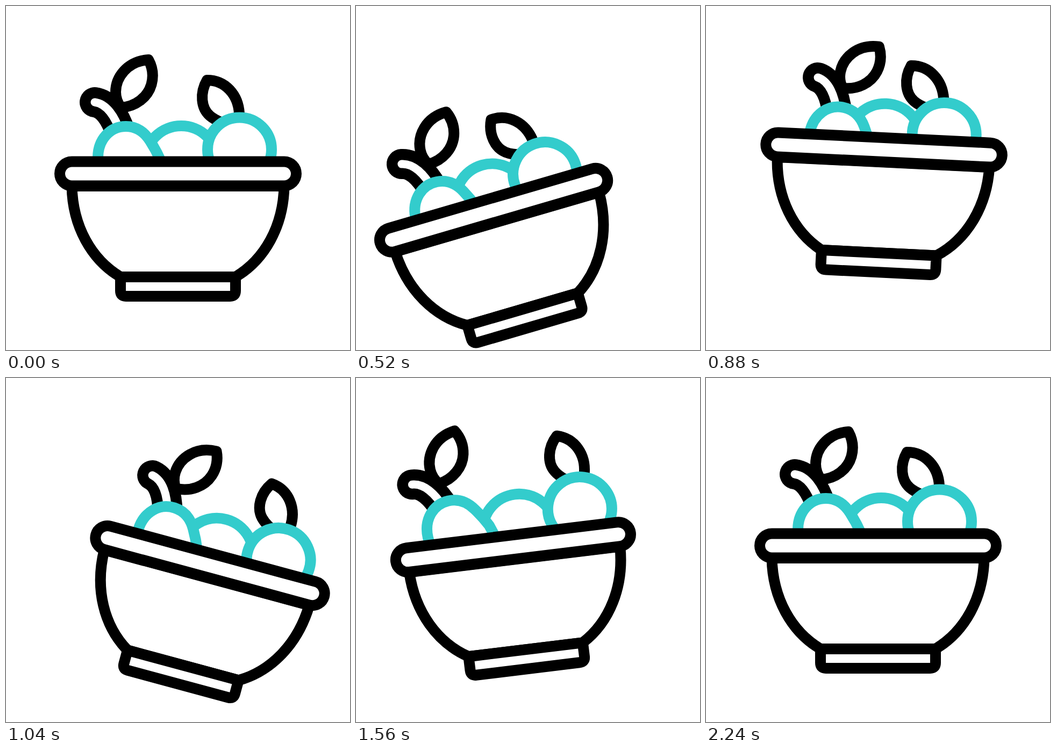
An HTML page that plays this animation: 640 px wide and 640 px high, repeating every 2.4 s.

```html
<!DOCTYPE html>
<html lang="en">
<head>
<meta charset="utf-8">
<title>Bowl</title>
<style>
html, body { margin: 0; width: 100%; height: 100%; overflow: hidden; background: #fff; }
svg { display: block; width: 100%; height: 100%; fill: #fff; stroke: #000; stroke-width: 20; stroke-linejoin: round; stroke-linecap: round; }
.fruit { stroke: #3cc; }
.stem { fill: none; }
</style>
</head>
<body>
<svg viewBox="0 0 640 640">
  <defs><path id="stemLine" d="M165 179C187 182 203 205 213 236"/></defs>
  <g id="bowl">
    <g id="mid"><circle class="fruit" cx="326" cy="291" r="68"/></g>
    <g id="left">
      <use href="#stemLine" class="stem" stroke-width="56"/>
      <path d="M265 100C225 103 204 133 204 160Q204 176 214 189C242 187 264 169 270.5 146Q277 122 265 100Z"/>
      <use href="#stemLine" class="stem" stroke="#fff" stroke-width="15"/>
      <path class="fruit" d="M174 320Q171 300 171 282C171 248 194 224 223 224C243 224 258 235 268 251Q279 268 287 286L296 320Z"/>
    </g>
    <g id="right">
      <path d="M374 138C360 162 363 190 379 204Q395 218 432 225Q436 215 434 200C432 165 408 138 374 138Z"/>
      <circle class="fruit" cx="434.5" cy="267" r="59.5"/>
    </g>
    <path d="M122.5 335C124 410 159 472 213 504H427C481 472 516 410 517.5 335Z"/>
    <path d="M213 504H427V530Q427 540 417 540H223Q213 540 213 530Z"/>
    <rect x="100" y="289.5" width="440" height="45" rx="22.5"/>
  </g>
</svg>
<script>
const LOOP = 2400, STEP = 40;
const part = id => document.getElementById(id);
const [bowl, mid, left, right] = ['bowl', 'mid', 'left', 'right'].map(part);

// Sine-eased value through [time, value] keys
function track(keys, t) {
  if (t <= keys[0][0]) return keys[0][1];
  for (let i = 1; i < keys.length; i++) {
    const [t0, a] = keys[i - 1], [t1, b] = keys[i];
    if (t < t1) return a + (b - a) * (1 - Math.cos(Math.PI * (t - t0) / (t1 - t0))) / 2;
  }
  return keys[keys.length - 1][1];
}

const tilt = [[200, 0], [600, -18], [1090, 16], [1480, -8], [1900, 4], [2240, 0]];
const lift = [[200, 0], [480, 63.5], [800, -63], [1080, 34], [1400, -28], [1720, 30], [2080, 0]];

// The contents sink on the first toss and fly up on the second
const toss = (t, low, high) => track([[400, 0], [670, low], [1440, high], [1800, 0]], t);

function pose(el, x, y, angle, px, py) {
  el.setAttribute('transform', `translate(${x} ${y}) rotate(${angle} ${px} ${py})`);
}

function draw(now) {
  const t = Math.floor(now % LOOP / STEP) * STEP;
  const sink = toss(t, 17.5, -17);
  pose(bowl, 0, track(lift, t), track(tilt, t), 320, 540);
  pose(mid, toss(t, -9, 12), toss(t, 6, -11), 0, 0, 0);
  pose(left, 0, sink, toss(t, 12.5, -8.5), 223, 340);
  pose(right, 0, sink, toss(t, -8, 19.5), 434.5, 335);
}

const start = performance.now();
function tick() {
  draw(performance.now() - start);
  requestAnimationFrame(tick);
}
tick();
</script>
</body>
</html>
```
